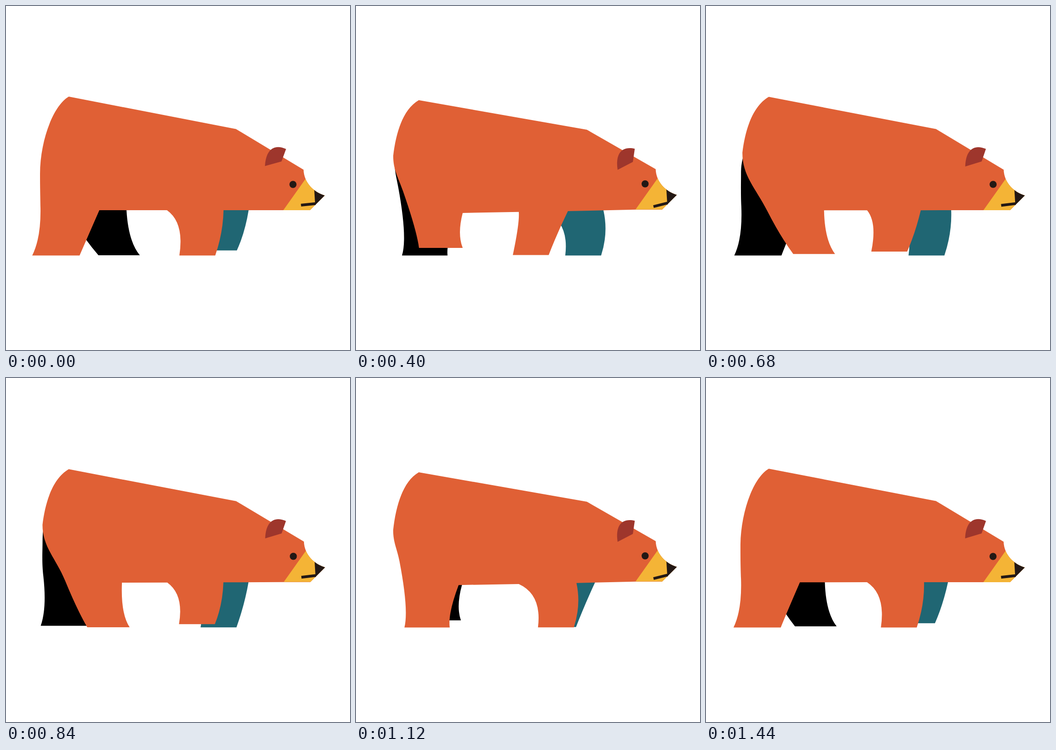
Recreate the animation shown at these times as an HTML page. Size 748 px wide and 748 px high, loop 1.48 s.

```html
<!DOCTYPE html>
<html lang="en">
<head>
<meta charset="utf-8">
<title>Walking bear</title>
<style>
  html, body { margin: 0; width: 100%; height: 100%; overflow: hidden; background: #fff; }
  svg { display: block; width: 100vw; height: 100vh; }
</style>
</head>
<body>
<svg viewBox="0 0 748 748">
  <clipPath id="headClip">
    <path d="M560 300H647V356C648 385 670 405 693 412L661 444H560Z"/>
  </clipPath>
  <path id="farHind" fill="#000"/>
  <path id="farFore" fill="#206673"/>
  <path id="body" fill="#e06035"/>
  <g id="head">
    <g clip-path="url(#headClip)">
      <path fill="#f4b436" d="M652 375L603 444H700V375Z"/>
      <path fill="#231815" d="M670 396L672.5 436H700V396Z"/>
    </g>
    <path id="mouth" stroke="#231815" stroke-width="6" d="M673 429.7H641.3"/>
    <circle cx="624" cy="388" r="7.7" fill="#231815"/>
  </g>
  <path id="ear" fill="#9e362c" d="M-37 10C-35 -26 -17 -39 9 -27L-1 0Z"/>
</svg>
<script>
const LOOP = 1480, HALF = LOOP / 2, STEP = 40, FAR_SHIFT = 58.5;
const el = id => document.getElementById(id);
const set = (id, name, value) => el(id).setAttribute(name, value);

// Four key poses per leg: push off, swing, touch down, stance.
// "bend" eases the move to the next pose: > 0 slows its end, < 0 its start.
const TIMES = [0, 400, HALF, 1140];

const HIND = [
  { bend: -0.1, knee: [75, 440], calf: 76, heel: 57, sole: 542.5, thigh: 203, shin: 173, toe: 160 },
  { bend: 0, knee: [102, 402], calf: 132, heel: 137, sole: 526, thigh: 232, shin: 220, toe: 232 },
  { bend: -0.05, knee: [140, 455], calf: 168, heel: 201, sole: 542, thigh: 262, shin: 266, toe: 291 },
  { bend: 0.5, knee: [92, 395], calf: 112, heel: 100, sole: 542.5, thigh: 221, shin: 196, toe: 199 }
];

const FORE = [
  { bend: 0.5, toe: 455, sole: 542.5 },
  { bend: -0.5, toe: 419, sole: 541.5 },
  { bend: 0.5, toe: 443.5, sole: 531.5 },
  { bend: -0.5, toe: 474.5, sole: 542.5 }
];

function pose(keys, time) {
  const t = time % LOOP;
  const i = TIMES.filter(k => k <= t).length - 1;
  const a = keys[i], b = keys[(i + 1) % keys.length];
  const u = (t - TIMES[i]) / ((TIMES[i + 1] || LOOP) - TIMES[i]);
  const f = u + a.bend * u * (1 - u);
  const mix = (p, q) => Array.isArray(p) ? p.map((v, k) => mix(v, q[k])) : p + (q - p) * f;
  return Object.fromEntries(Object.keys(a).map(k => [k, mix(a[k], b[k])]));
}

const bob = t => (1 - Math.cos(2 * Math.PI * t / HALF)) / 2;
const belly = (x, b) => 444 + b * ((640 - x) / 58 - 1);

// The rump narrows as the knee moves forward
function hindLeg(t, b, inset) {
  const { knee: [kx, ky], calf, heel, sole, thigh, shin, toe } = pose(HIND, t);
  const tuck = 1 - Math.exp((75 - kx) / 6);
  const x = 74 + (5 + inset) * tuck + 2 * b;
  const y = 318 + 47 * Math.exp((75 - kx) / 15);
  const my = sole - 38, drop = 0.4 * (ky - y), k = drop / (my - ky);
  return {
    x, y, tuck,
    outline: `C${x} ${y + drop} ${kx - (calf - kx) * k} ${ky - drop} ${kx} ${ky}` +
      `Q${calf} ${my} ${heel} ${sole}L${toe} ${sole}` +
      `Q${shin} ${sole - 30} ${thigh} ${belly(thigh, b)}`
  };
}

// The whole leg follows from how far the toe reaches
function foreLeg(t, b, dx) {
  const { toe, sole } = pose(FORE, t), reach = toe - 455;
  const back = 350 + 4 * b + dx, front = 473 + 0.34 * reach + dx;
  return {
    back, front,
    outline: `L${back} ${belly(back, b)}` +
      `Q${388 + 0.89 * reach + dx} 471 ${toe - 78 + dx} ${sole}H${toe + dx}` +
      `Q${472 + 0.95 * reach + dx} 493 ${front} ${belly(front, b)}`
  };
}

function draw(t) {
  const b = bob(t), late = bob(t - 25);
  const hx = 4.7 * b, hy = -1.3 * b, top = 197 + 8 * b;
  const at = (x, y) => `${x + hx} ${y + hy}`;

  const farHind = hindLeg(t + HALF, b, 3);
  set("farHind", "d", `M90 300Q${farHind.x} ${farHind.y - 25} ${farHind.x} ${farHind.y}` +
    `${farHind.outline}V350Z`);

  const farFore = foreLeg(t + HALF, b, FAR_SHIFT);
  set("farFore", "d", `M${farFore.back} 420${farFore.outline}V420Z`);

  const hind = hindLeg(t, b, 0);
  set("body", "d",
    `M136.5 ${top}C102 ${top + 20} ${hind.x + 6 * hind.tuck} ${hind.y - 0.42 * (hind.y - top)} ` +
    `${hind.x} ${hind.y}${hind.outline}${foreLeg(t, b, 0).outline}` +
    `L${at(603, 444)}L${at(661, 444)}L${at(693, 412)}` +
    `C${at(670, 405)} ${at(648, 385)} ${at(647, 356)}` +
    `L${500 + 2 * b} ${267.5 + 1.5 * b}Z`);

  set("head", "transform", `translate(${hx} ${hy})`);
  set("mouth", "transform", `rotate(${-6 - 8 * late} 673 429.7)`);
  set("ear", "transform",
    `translate(${600 + 3 * late} ${338 + 0.7 * late}) rotate(${-12 * late})`);
}

const start = performance.now();
function tick() {
  const t = (performance.now() - start) % LOOP;
  draw(Math.floor(t / STEP) * STEP);
  requestAnimationFrame(tick);
}
tick();
</script>
</body>
</html>
```
